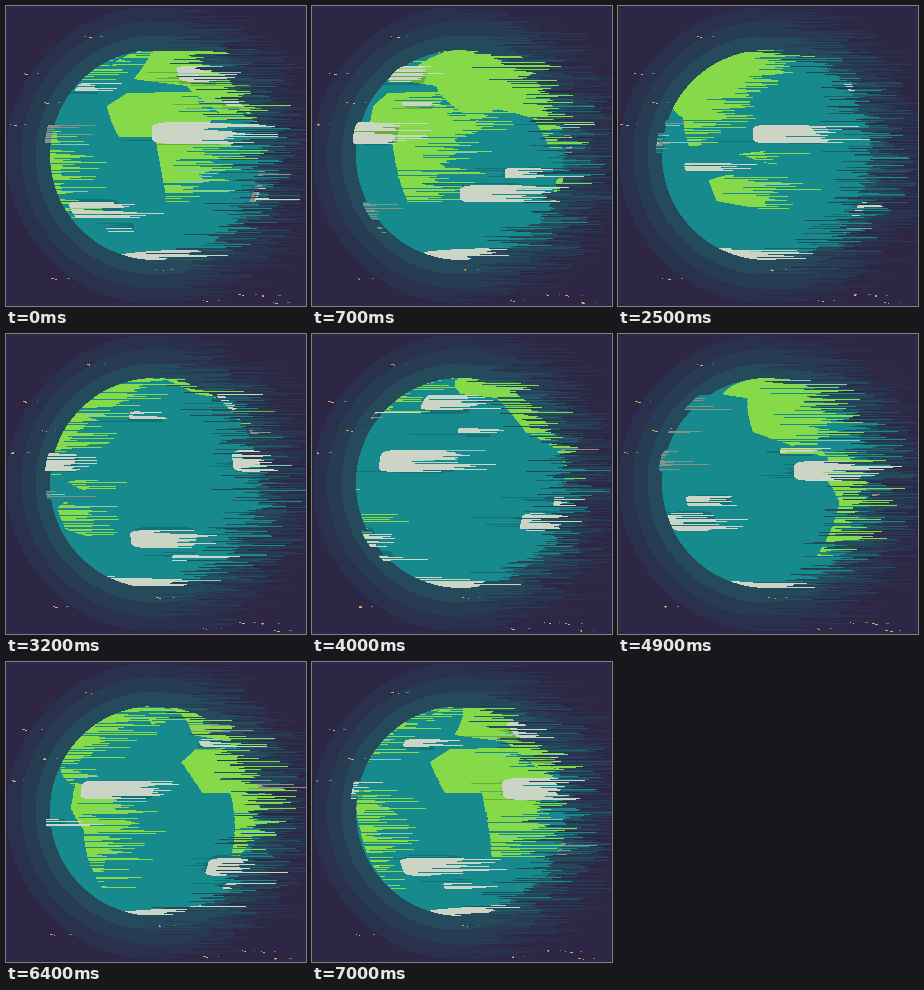
Write an HTML page with a canvas that moves like this. It is 300 px wide and 300 px high and loops after 7100 ms.

```html
<!DOCTYPE html>
<html>
<head>
<meta charset="utf-8">
<style>
html, body { margin: 0; height: 100%; overflow: hidden; background: #2d2645; }
canvas { display: block; width: 100vw; height: 100vh; image-rendering: pixelated; }
</style>
</head>
<body>
<canvas id="stage" width="300" height="300"></canvas>
<script>
const SIZE = 300, MID = 148.5, GLOBE = 105, SKY = 111, RING = 14.5;
const CAMERA = 6; // viewing distance in globe radii
const FRAMES = 71, STEP = 100, DEG = 180 / Math.PI;

// Colours run from dark to bright, so an index also serves as brightness.
const PALETTE = ['2d2645', '2a314d', '273c53', '254a5c', '1f606c', '127277', '178a8d', '8c8f88',
  '68b03e', '86da4a', '7eccc8', 'ccd4c6'].map(hex => [0, 2, 4].map(i => parseInt(hex.substr(i, 2), 16)));
const [DIM, OCEAN_SHADE, OCEAN, FAR_CLOUD, LAND_SHADE, LAND, GLINT, CLOUD] = [4, 5, 6, 7, 8, 9, 10, 11];

// Key points of the coasts: longitude, screen row.
const CONTINENTS = {
  africa: [[-26, 100], [-16, 87], [22, 86], [43, 118], [15, 196], [6, 196], [0, 131], [-17, 131]],
  eurasia: [[-14, 73], [20, 80], [28, 102], [43, 115], [54, 103], [75, 112], [86, 146],
    [108, 102], [130, 72], [155, 42], [-4, 42]],
  australia: [[96, 174], [98, 195], [122, 203], [129, 182], [108, 168]],
  islands: [[112, 148], [124, 145], [126, 158]],
  northAmerica: [[185, 42], [200, 60], [230, 64], [238, 98], [275, 124], [270, 104], [288, 72], [305, 42]],
  southAmerica: [[276, 122], [275, 147], [283, 168], [280, 228], [290, 208], [309, 150], [293, 122]],
  greenland: [[308, 42], [318, 64], [335, 42]]
};

// West end, middle row, height; bigger clouds are also longer.
const CLOUDS = [[-1, 127, 21], [-52, 205, 17], [-30, 224, 6], [15, 68, 15], [-54, 81, 7], [-116, 128, 18],
  [142, 137, 19], [70, 188, 17], [90, 167, 10], [136, 117, 6], [39, 97, 6], [209, 161, 8]];

const STARS = [[79, 30], [16, 67], [34, 96], [2, 118], [44, 272], [150, 263], [197, 294], [232, 288], [253, 289], [266, 296]];

// Unrolled map with two columns per degree; returns a lookup.
function makeMap(trace) {
  const c = document.createElement('canvas');
  c.width = 720;
  c.height = SIZE;
  const g = c.getContext('2d');
  for (const turn of [-720, 0, 720]) {
    g.setTransform(2, 0, 0, 1, turn, 0);
    g.beginPath();
    trace(g);
    g.fill();
  }
  const pixels = g.getImageData(0, 0, 720, SIZE).data;
  return (lon, y) => {
    const col = ((Math.round(lon * 2) % 720) + 720) % 720;
    return pixels[(Math.round(y) * 720 + col) * 4 + 3] > 127;
  };
}

const isLand = makeMap(g => {
  for (const coast of Object.values(CONTINENTS)) {
    coast.forEach(([lon, y], i) => i ? g.lineTo(lon, y) : g.moveTo(lon, y));
  }
});
const isCloud = makeMap(g => {
  for (const [west, y, h] of CLOUDS) g.roundRect(west, y - h / 2, 8 + 1.5 * h, h, h / 4);
});

function seeded(seed) {
  return () => {
    seed = (seed + 0x6D2B79F5) | 0;
    let t = Math.imul(seed ^ (seed >>> 15), 1 | seed);
    t ^= t + Math.imul(t ^ (t >>> 7), 61 | t);
    return ((t ^ (t >>> 14)) >>> 0) / 4294967296;
  };
}

// Longitudes where the line of sight enters and leaves a sphere.
function longitudes(dx, dy, radius) {
  const s = dx / Math.sqrt(radius * radius - dy * dy);
  const turn = Math.asin(s), tilt = s / CAMERA;
  return [(turn - tilt) * DEG, (Math.PI - turn - tilt) * DEG];
}

function sample(x, y, spin, drift) {
  const dx = x - MID, dy = y - MID, r = Math.hypot(dx, dy);
  if (r < SKY) {
    const [near, far] = longitudes(dx, dy, SKY);
    if (isCloud(near + drift, y)) return CLOUD;
    if (r >= GLOBE && isCloud(far + drift, y)) return FAR_CLOUD;
  }
  if (r >= GLOBE) return Math.max(0, 3 - Math.floor((r - GLOBE) / RING));
  const [lon] = longitudes(dx, dy, GLOBE);
  const iceEdge = 245 - 3.5 * Math.cos((lon + spin - 80) / DEG);
  if (y > iceEdge) return CLOUD;
  const shaded = isCloud(lon + drift, MID + dy * SKY / GLOBE);
  if (isLand(lon + spin, y)) return shaded ? LAND_SHADE : LAND;
  return shaded ? OCEAN_SHADE : OCEAN;
}

// dir 1 blows bright areas right over dark ones, dir -1 bleeds dark areas left into bright ones.
function smear(row, dir, chance, reach, rnd) {
  let x = dir > 0 ? 0 : SIZE - 1, last = row[x], held = 0, left = 0;
  for (; x >= 0 && x < SIZE; x += dir) {
    const c = row[x];
    if ((last - c) * dir > 0 && left <= 0 && rnd() < chance) {
      held = last;
      if (dir > 0 && held > OCEAN && rnd() < .06) held = GLINT;
      if (held >= OCEAN && c < DIM && rnd() < .45) held = DIM;
      left = reach * rnd() ** 2;
    }
    if (left-- > 0 && (held - c) * dir > 0) row[x] = held;
    last = c;
  }
}

const ctx = document.getElementById('stage').getContext('2d');
const image = ctx.createImageData(SIZE, SIZE);
const row = new Uint8Array(SIZE);

function dash(x, y, color, rnd) {
  ctx.fillStyle = color;
  ctx.fillRect(x + Math.floor(5 * rnd() ** 2), y, 1 + Math.floor(rnd() * 3), 1);
}

function draw(frame) {
  const rnd = seeded(frame * 7919 + 17);
  for (let y = 0; y < SIZE; y++) {
    for (let x = 0; x < SIZE; x++) row[x] = sample(x, y, frame * 5, frame * 10);
    smear(row, -1, .65, 50, rnd);
    smear(row, 1, .8, 48, rnd);
    row.forEach((c, x) => image.data.set([...PALETTE[c], 255], (y * SIZE + x) * 4));
  }
  ctx.putImageData(image, 0, 0);
  for (const [x, y] of STARS) {
    dash(x, y, '#d9a02c', rnd);
    dash(x + 3, y + 1, '#b9b4a8', rnd);
    dash(x + 15, y, '#77737f', rnd);
  }
}

const start = performance.now();
let shown = -1;
function tick() {
  const frame = Math.floor((performance.now() - start) / STEP) % FRAMES;
  if (frame !== shown) draw(shown = frame);
  requestAnimationFrame(tick);
}
tick();
</script>
</body>
</html>
```
